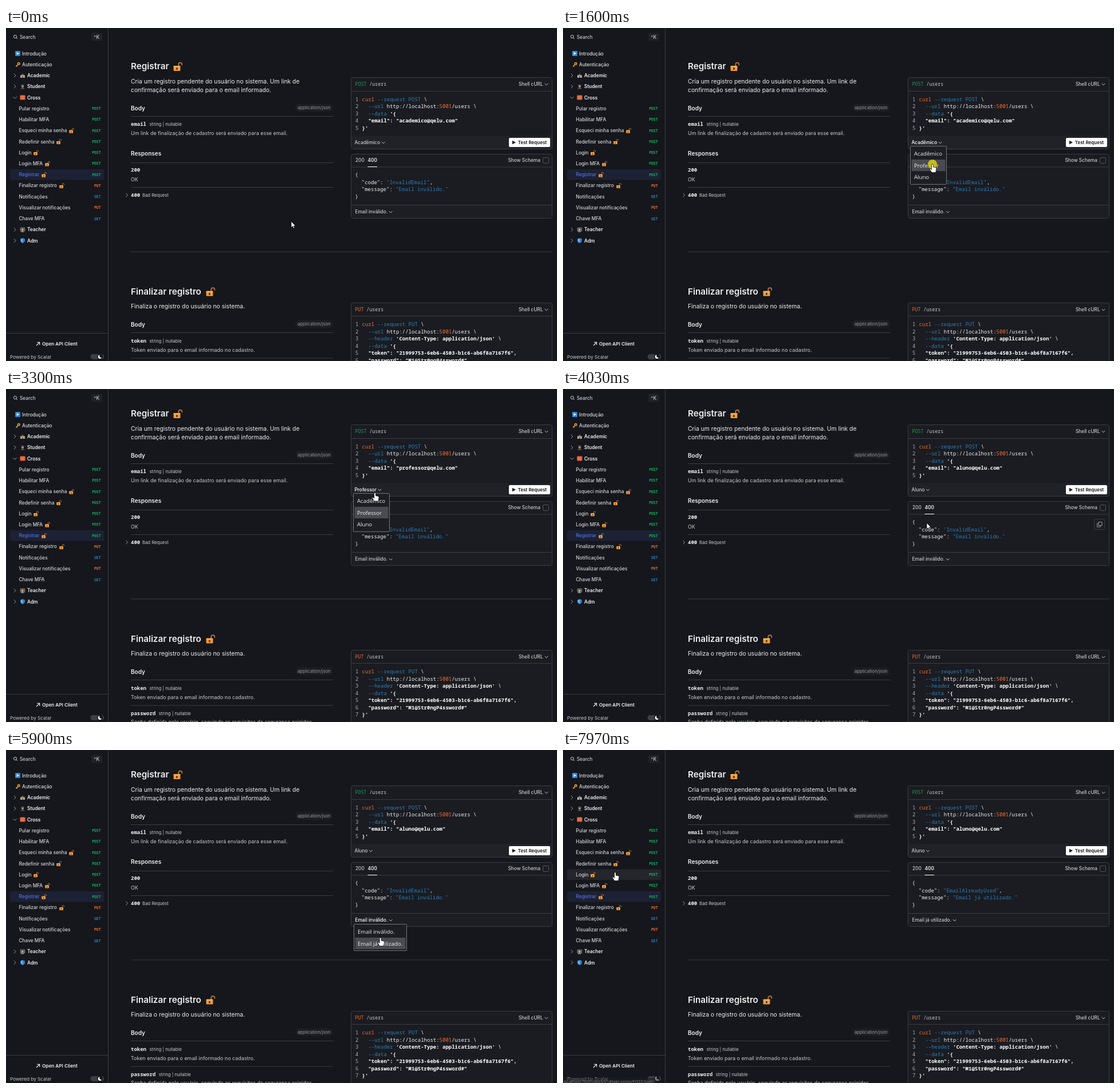
Write an HTML page that moves like this. It is 962 by 582 pixels and loops after 8000 ms.

```html
<!DOCTYPE html>
<html lang="pt">
<head>
<meta charset="utf-8">
<title>API docs</title>
<style>
html, body { margin: 0; width: 100%; height: 100%; overflow: hidden; background: #15171c; }
svg { display: block; }
text { white-space: pre; font-family: Inter, sans-serif; }
.mono { font-family: "Noto Sans Mono", "DejaVu Sans Mono", monospace; font-weight: 500; font-variant-ligatures: none; }
.strong { font-weight: 600; }
.menu text, .status { font-family: "Open Sans", sans-serif; }
</style>
</head>
<body>
<svg id="stage" width="962" height="582" viewBox="0 0 962 582"></svg>
<script>
const BRIGHT = '#ffffff', WHITE = '#eeeff0', SOFT = '#c9cacd', GRAY = '#97999e', LINE = '#3b3d43';
const BLUE = '#2b7cb8', ORANGE = '#f46c30', GREEN = '#12b45c', PANEL = '#1a1c21', RAISED = '#202228';
const $ = id => document.getElementById(id);

// Drawing helpers, each returns SVG markup
const text = (x, y, s, size, fill = WHITE, weight = 400, extra = '') =>
  `<text x="${x}" y="${y}" font-size="${size}" fill="${fill}" font-weight="${weight}" ${extra}>${s}</text>`;
const mono = (x, y, s, size, fill, extra = '') =>
  `<text class="mono" x="${x}" y="${y}" font-size="${size}" fill="${fill}" ${extra}>${s}</text>`;
const strong = 'style="font-weight:600"';
const rect = (x, y, w, h, fill, r = 0, extra = '') =>
  `<rect x="${x}" y="${y}" width="${w}" height="${h}" rx="${r}" fill="${fill}" ${extra}/>`;
const box = (x, y, w, h, fill, r = 3, stroke = LINE) => rect(x, y, w, h, fill, r, `stroke="${stroke}"`);
const hline = (x1, x2, y) => rect(x1, y, x2 - x1, 1, LINE);
const path = (d, stroke, width = 1, extra = '') =>
  `<path d="${d}" fill="none" stroke="${stroke}" stroke-width="${width}" ${extra}/>`;
const fill = (d, color) => `<path d="${d}" fill="${color}"/>`;
const group = (x, y, s, k = 1, extra = '') => `<g transform="translate(${x} ${y}) scale(${k})" ${extra}>${s}</g>`;
const down = (x, y) => path(`M${x - 2.8} ${y - 1.4}l2.8 2.8 2.8-2.8`, SOFT);
const right = (x, y) => path(`M${x - 1.6} ${y - 3.2}l3.2 3.2-3.2 3.2`, GRAY);

// Code line: alternating colour and token
function code(x, y, ...parts) {
  let s = '';
  for (let i = 0; i < parts.length; i += 2)
    s += `<tspan fill="${parts[i]}" class="${parts[i] == BRIGHT ? 'strong' : ''}">${parts[i + 1]}</tspan>`;
  return mono(x, y, s, 9, WHITE);
}
const listing = (y, rows) => rows.map((row, i) => {
  const ly = y + i * 12.55, indent = i > 0 && i < rows.length - 1 ? 632.4 : 621.6;
  return mono(610, ly, i + 1, 9, '#a9abaf') + code(indent, ly, ...row);
}).join('');

// Small icons on a 16 unit grid
const ICONS = {
  lock: path('M9 8V4.4a2.9 2.9 0 0 1 5.8 0V6', '#b9773c', 1.7) + rect(.5, 7, 11.5, 8.5, '#f59b36', 1) +
    rect(.5, 7, 11.5, 2, '#ffb458', 1) + fill('M5 10h2.4v3.6H5z', '#4a2b14'),
  play: rect(0, 0, 16, 16, '#2f84de', 2) + fill('M5 3.5L13 8 5 12.5z', '#fff'),
  key: path('M9 7L2 14M4.5 11.5l2.5 2.5', '#f2a93b', 2.4) +
    '<circle cx="11" cy="5" r="3.2" fill="none" stroke="#f2a93b" stroke-width="2.6"/>',
  school: rect(1, 7, 14, 8, '#c9b596') + fill('M4 7L8 2l4 5z', '#8d6f57') + rect(6.5, 10, 3, 5, '#58483e') +
    rect(2.5, 9, 2.5, 3, '#6fa2c8') + rect(11, 9, 2.5, 3, '#6fa2c8'),
  student: fill('M2 16c0-7 12-7 12 0z', '#4b4d55') + '<circle cx="8" cy="7" r="3.6" fill="#d7ac83"/>' +
    fill('M2 4l6-3 6 3-6 3z', '#55575f'),
  brick: rect(0, 1, 16, 14, '#e2552f', 1) + path('M0 5.5H16M0 10H16M5 1V5.5M11 1V5.5M8 5.5V10M5 10V15M11 10V15', '#f6a06f'),
  teacher: box(1, 2, 14, 11, '#4d5b55', 1, '#b99a73') + fill('M3 16c0-6 9-6 9 0z', '#8f9499') +
    '<circle cx="7.5" cy="8" r="3" fill="#dcb48c"/>',
  shield: fill('M8 0l7 2.5V8c0 4-3 6.5-7 8-4-1.5-7-4-7-8V2.5z', '#2f86d6') + fill('M8 2v12c-3-1.5-5-3-5-6V3.8z', '#6ab7f2'),
};
const icon = (name, x, y, size) => group(x, y, ICONS[name], size / 16);

// Sidebar
const rowY = i => 44.5 + i * 19.24;
const entries = [
  ['Pular registro', 'POST'], ['Habilitar MFA', 'POST'], ['Esqueci minha senha', 'POST', 110],
  ['Redefinir senha', 'POST', 88], ['Login', 'POST', 48], ['Login MFA', 'POST', 68],
  ['Registrar', 'POST', 62], ['Finalizar registro', 'PUT', 93], ['Notificações', 'GET'],
  ['Visualizar notificações', 'PUT'], ['Chave MFA', 'GET'],
];
const groups = [['Academic', 'school', 2], ['Student', 'student', 3], ['Cross', 'brick', 4], ['Teacher', 'teacher', 16], ['Adm', 'shield', 17]];
const verbColor = { POST: GREEN, PUT: ORANGE, GET: BLUE };
function sidebar() {
  let s = `<circle cx="16" cy="15" r="2.6" fill="none" stroke="${SOFT}"/>` + path('M18 17l2 2', SOFT) +
    text(24, 18.5, 'Search', 8.3, SOFT, 500) + rect(149, 8.5, 19, 14, RAISED, 2) + text(153.5, 18.5, '^K', 8.3, SOFT, 500);
  s += rect(7, 0, 164, 18.5, '#24262c', 2, 'id="hover" visibility="hidden"');
  s += rect(7, 247, 164, 18.5, '#1c2135', 2);
  s += icon('play', 16, 40, 9) + text(28, 47.6, 'Introdução', 8.3, '#dcdddf', 500);
  s += icon('key', 16, 59.5, 9) + text(28, 66.8, 'Autenticação', 8.3, '#dcdddf', 500);
  for (const [name, pic, i] of groups) {
    const y = rowY(i);
    s += (name == 'Cross' ? path(`M12.3 ${y - 1.5}l3.2 3.2 3.2-3.2`, GRAY) : right(15.5, y)) +
      icon(pic, 24.5, y - 4.5, 9) + text(37, y + 3.1, name, 8.3, WHITE, 600);
  }
  entries.forEach(([name, verb, lock], i) => {
    const y = rowY(i + 5);
    s += text(22.5, y + 3.1, name, 8.3, name == 'Registrar' ? '#5273dd' : '#d4d5d8', 500) +
      mono(165.5, y + 2.4, verb, 6.4, verbColor[verb], 'text-anchor="end" style="font-weight:700"');
    if (lock) s += icon('lock', lock, y - 4.5, 9.3);
  });
  s += rect(178, 0, 1, 582, LINE) + hline(0, 178, 533);
  s += path('M53 555l5.5-5.5M54 549.3h4.7V554', WHITE, 1.1) + text(63, 555.2, 'Open API Client', 8.2, WHITE, 600);
  s += text(7, 577.5, 'Powered by Scalar', 8.2, SOFT);
  s += rect(147.5, 570, 23.5, 9, '#3d3f45', 4.5) + '<circle cx="164" cy="574.5" r="5" fill="#15171c"/>' +
    fill('M163.5 571a3.5 3.5 0 1 0 3.8 4.8 3.3 3.3 0 0 1-3.8-4.8z', '#fff');
  return s + `<g id="status">${rect(0, 573, 165, 9, '#1c1e24', 0, 'opacity=".6"')}${
    text(1, 582, 'localhost:5001/docs/v1#tag/-cross/POST/login', 7.4, '#85878b', 400, 'class="status"')}</g>`;
}

// Main column
const title = (y, s, lockX) => text(218, y, s, 15.2, WHITE, 600) + icon('lock', lockX, y - 13, 16.5);
const para = (y, s) => text(218, y, s, 10.32);
const field = (y, name, hint, desc) => mono(218, y, name, 9, WHITE, strong) +
  text(218 + name.length * 5.4 + 5.5, y, hint, 7.75, SOFT) + text(218, y + 15.5, desc, 8.95, SOFT);
const bodyHead = y => text(218, y, 'Body', 10, WHITE, 600) + rect(505, y - 11, 66, 13.5, '#1c1e24', 6.7) +
  text(509, y - 1.5, 'application/json', 7.7, GRAY) + hline(218, 571, y + 10.5);
const panelHead = (y, verb, color) => mono(609.5, y, verb, 8.3, color) +
  mono(609.5 + (verb.length + 1) * 4.98, y, '/users', 8.3, SOFT) +
  text(895, y + .3, 'Shell cURL', 8.3, SOFT, 500) + down(943.5, y - 2.6);
const copyButton = (id, y) => group(927, y, box(.5, .5, 18, 18, '#1c1e24', 2) +
  path('M8 5.5h6v6H8zM8 8H5.5v6h6V11.5', GRAY), 1, `id="${id}"`);
const url = [BLUE, '--url ', WHITE, 'http://localhost:', ORANGE, '5001', WHITE, '/users \\'];

function content() {
  let s = title(72, 'Registrar', 292) +
    para(97, 'Cria um registro pendente do usuário no sistema. Um link de') +
    para(112.2, 'confirmação será enviado para o email informado.') + bodyHead(143.5) +
    field(171, 'email', 'string | nullable', 'Um link de finalização de cadastro será enviado para esse email.') +
    text(218, 223, 'Responses', 10, WHITE, 600) + hline(218, 571, 235) +
    mono(218, 251.3, '200', 9, WHITE, strong) + text(218, 267.5, 'OK', 8.95, SOFT) + hline(218, 571, 278) +
    right(211, 292) + mono(218, 295.3, '400', 9, WHITE, strong) + text(238, 295.3, 'Bad Request', 7.7, SOFT) +
    hline(218, 954, 390.5);
  s += title(465.5, 'Finalizar registro', 349) +
    para(490.2, 'Finaliza o registro do usuário no sistema.') + bodyHead(521.5) +
    field(550, 'token', 'string | nullable', 'Token enviado para o email informado no cadastro.') + hline(218, 571, 576.5) +
    field(593.5, 'password', 'string | nullable', 'Senha definida pelo usuário, seguindo os requisitos de segurança exigidos.');

  // Request panel
  s += box(602.5, 86.5, 351, 125, PANEL) + rect(603, 188.5, 350, 22.5, RAISED, 2) + hline(603, 953, 110) +
    panelHead(101, 'POST', '#239858') + listing(127.6, [
      [ORANGE, 'curl ', BLUE, '--request POST ', WHITE, '\\'], url, [BLUE, '--data ', BRIGHT, "'{"],
      [BRIGHT, '"email": "<tspan id="mail"></tspan>"'], [BRIGHT, "}'"]]) +
    text(608.5, 203, '', 8.3, SOFT, 500, 'id="role"') + `<g id="roleMark">${down(0, 200.4)}</g>` +
    rect(878, 192, 72, 16, '#fff', 2) + fill('M884 196.7l6 3.3-6 3.3z', '#111') +
    text(893.8, 203, 'Test Request', 8, '#111', 600) + copyButton('copyTop', 118);

  // Response panel
  s += box(602.5, 220.5, 351, 112, PANEL) + rect(603, 310, 350, 22, '#1c1e24', 2) + hline(603, 953, 242.5) + hline(603, 953, 309) +
    text(610, 234.3, '200', 8.3, SOFT, 500) + text(631.5, 234.3, '400', 8.3, WHITE, 600) + rect(631.5, 242, 16.5, 1, '#fff') +
    text(876.5, 234.3, 'Show Schema', 8.3, SOFT, 500) + box(937.5, 226.5, 10, 10, 'none', 2, '#55575d') +
    code(609.5, 260.1, WHITE, '{') +
    code(620.8, 272.8, WHITE, '"code": ', BLUE, '"<tspan id="errCode"></tspan>"', WHITE, ',') +
    code(620.8, 285.4, WHITE, '"message": ', BLUE, '"<tspan id="errText"></tspan>"') +
    code(609.5, 298, WHITE, '}') +
    text(609.5, 324.2, '', 8.3, SOFT, 500, 'id="err"') + `<g id="errMark">${down(0, 321.6)}</g>` + copyButton('copyLow', 251);

  // Second request panel
  s += box(602.5, 480.5, 351, 160, PANEL) + hline(603, 953, 503) + panelHead(495, 'PUT', ORANGE) + listing(521.1, [
    [ORANGE, 'curl ', BLUE, '--request PUT ', WHITE, '\\'], url,
    [BLUE, '--header ', BRIGHT, "'Content-Type: application/json' ", WHITE, '\\'], [BLUE, '--data ', BRIGHT, "'{"],
    [BRIGHT, '"token": "21999753-6eb6-4503-b1c6-ab6f8a7167f6",'], [BRIGHT, '"password": "M1@Str0ngP4ssword#"'], [BRIGHT, "}'"]]);
  return s + '<g id="menu" class="menu"></g>';
}

$('stage').innerHTML = rect(0, 0, 962, 582, '#15171c') + `<g id="content">${content()}</g>` + sidebar() +
  '<circle id="click" r="8" fill="#c6bb1c"/><path id="pointer" fill="#fff" stroke="#000" stroke-width=".7" stroke-linejoin="round"/>';

// Timeline
const LOOP = 8000;
const roles = ['Acadêmico', 'Professor', 'Aluno'];
const errors = ['Email inválido.', 'Email já utilizado.'];
const errorCodes = ['InvalidEmail', 'EmailAlreadyUsed'];
// Open menus: from, to, x, y, width, items
const menus = [[890, 1660, 606.5, 206.5, 63, roles], [3140, 3810, 606.5, 206.5, 63, roles], [5450, 6460, 607.5, 328.5, 92, errors]];
const clicks = [[890, 940], [1560, 1660], [3140, 3190], [3760, 3810], [5450, 5550], [6410, 6460]];
// Pointer: time, x, y
const track = [
  [160, 498, 338], [640, 640, 199.5], [1140, 640, 199.5], [1400, 645, 238], [2130, 645, 238], [2430, 700, 152],
  [2630, 743, 146], [2890, 648, 175], [3000, 644, 174], [3230, 644, 174], [3560, 645, 237], [3810, 645, 237],
  [4030, 635, 234], [4330, 715, 145], [4560, 745, 141], [4610, 745, 141], [5290, 643, 292], [5400, 644, 295],
  [5750, 644, 295], [5960, 656, 336], [6460, 656, 336], [6510, 656, 338], [6860, 656, 338], [6870, 658, 339.5],
  [7070, 658, 339.5], [7600, 52, 225], [7820, 91, 214],
];
const ARROW = 'M0 0V10.8L2.5 8.5 4.1 12.2 5.8 11.4 4.2 7.9H7.5Z';
const HAND = 'M-1.4 1.2a1.4 1.4 0 0 1 2.8 0V5l4.2.9q1.6.5 1.4 2.2L6 12.5V14.5H-1.2L-4.6 9.2q-.3-1.7 1.3-1.3l1.9 1.6z';

const ease = (t, a, b) => { const u = Math.min(1, Math.max(0, (t - a) / (b - a))); return u * u * (3 - 2 * u); };
const within = (t, [a, b]) => t >= a && t < b;
const show = (id, on) => $(id).setAttribute('visibility', on ? 'visible' : 'hidden');
const move = (id, x, y) => $(id).setAttribute('transform', `translate(${x} ${y})`);

function position(t) {
  let [, x, y] = track[0];
  for (let i = 1; i < track.length && t > track[i - 1][0]; i++) {
    const [a, px, py] = track[i - 1], [b, qx, qy] = track[i], u = ease(t, a, b);
    x = px + (qx - px) * u;
    y = py + (qy - py) * u;
  }
  return [x, y];
}

function select(id, value, lit) {
  const el = $(id);
  el.textContent = value;
  el.setAttribute('fill', lit ? '#fff' : SOFT);
  move(id + 'Mark', +el.getAttribute('x') + el.getComputedTextLength() + 5.5, 0);
}

// The chosen item stays lit until the pointer enters the list
function menuMarkup([, , x, y, w, items], py, chosen) {
  const hot = py < y ? chosen : Math.max(0, Math.min(items.length - 1, Math.floor((py - y - 2.5) / 20.6)));
  return box(x, y, w, items.length * 20.6 + 5, '#1c1e24', 1, '#74767b') +
    rect(x + 2, y + 2.8 + hot * 20.6, w - 4, 20.2, '#494b50') +
    items.map((s, i) => text(x + 6.5, y + 16.5 + i * 20.6, s, 9.65)).join('');
}

function draw(t) {
  const [x, y] = position(t), scroll = 24 * ease(t, 1660, 1770), py = y + scroll;
  const role = t < 1660 ? 0 : t < 3810 ? 1 : 2, err = t < 6460 ? 0 : 1;
  const open = menus.find(m => within(t, m));
  const inPanel = x > 602 && x < 954, side = x < 172;
  const onRole = inPanel && x < 668 && within(py, [189, 211]);
  const onErr = inPanel && x < 690 && within(py, [310, 333]);

  move('content', 0, -scroll);
  $('mail').textContent = ['academico', 'professor', 'aluno'][role] + '@qelu.com';
  $('errCode').textContent = errorCodes[err];
  $('errText').textContent = errors[err];
  select('role', roles[role], onRole || open && open[5] == roles);
  select('err', errors[err], onErr || open && open[5] == errors);
  show('copyTop', !open && inPanel && within(py, [111, 188]));
  show('copyLow', !open && inPanel && within(py, [243, 309]));
  $('menu').innerHTML = open ? menuMarkup(open, py, open[5] == roles ? role : err) : '';

  show('hover', side);
  $('hover').setAttribute('y', rowY(Math.round((y - 44.5) / 19.24)) - 9.2);
  show('status', t >= 7970);
  show('click', clicks.some(c => within(t, c)));
  move('click', x, y);
  move('pointer', x, y);
  $('pointer').setAttribute('d', open || side || onRole || onErr ? HAND : ARROW);
}

const start = performance.now();
function tick() {
  draw((performance.now() - start) % LOOP);
  requestAnimationFrame(tick);
}
tick();
</script>
</body>
</html>
```
